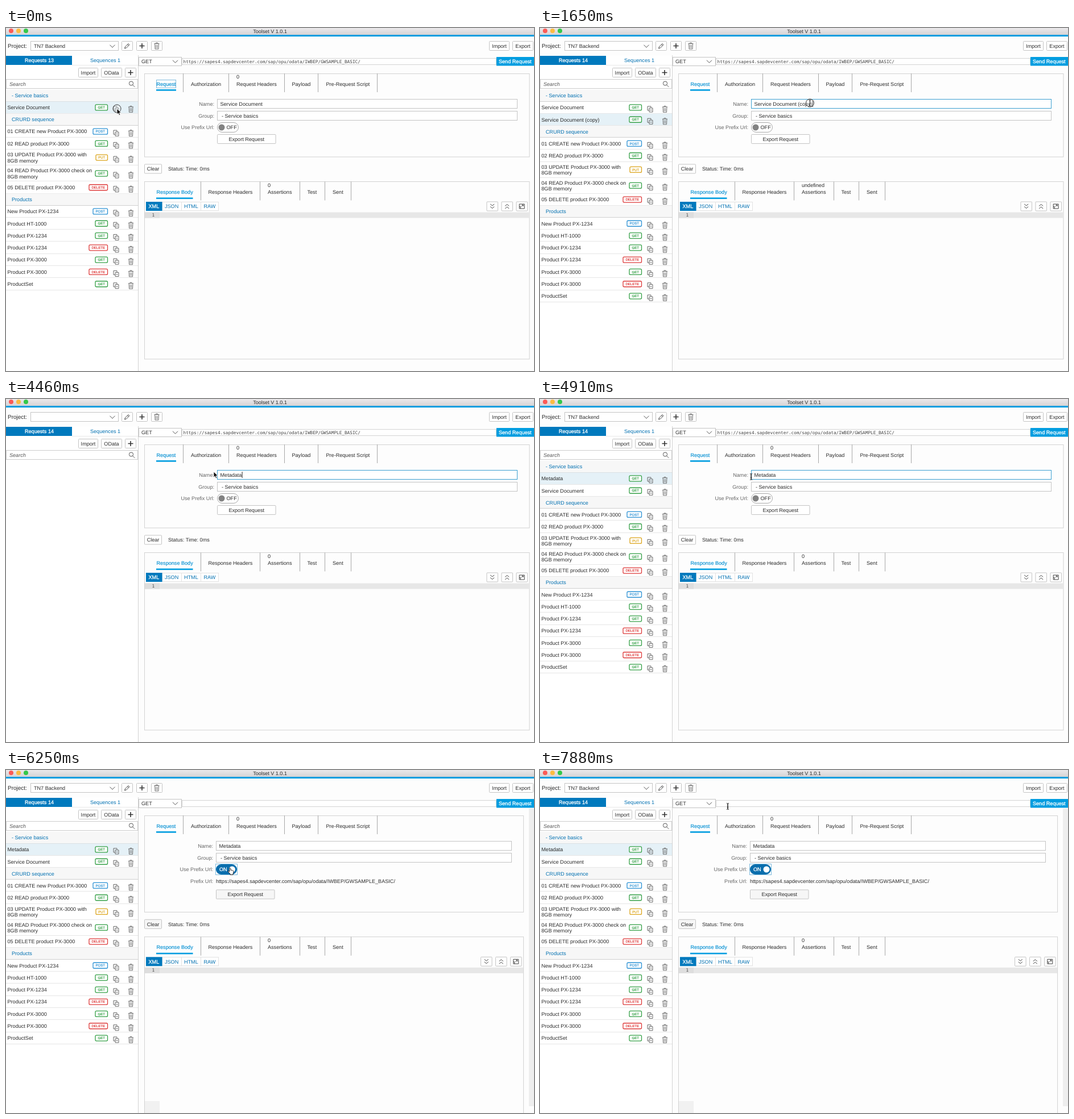
An HTML page for the animation above (8000 ms loop, 928 by 604 pixels).

```html
<!DOCTYPE html>
<html lang="en">
<head>
<meta charset="utf-8">
<style>
  html, body { margin: 0; width: 100%; height: 100%; overflow: hidden; background: #fdfdfd; }
  svg { display: block; width: 928px; height: 604px; }
  text { font: 9.1px "Liberation Sans", Arial, sans-serif; fill: #2c2c2c; text-rendering: geometricPrecision; }
  .mono { font: 7.72px "DejaVu Sans Mono", monospace; fill: #444; }
  .blue { fill: #0070b1; }
  .on { fill: #008fd3; stroke: #008fd3; stroke-width: .15; }
  .white { fill: #fff; stroke: #fff; stroke-width: .3; }
  .label { fill: #666; text-anchor: end; }
  .mid { text-anchor: middle; }
  .search { font-style: italic; fill: #555; }
  .big { font-size: 10px; }
  .title { font-size: 9px; text-anchor: middle; }
  .badge { font-size: 6.1px; text-anchor: middle; stroke-width: .2; }
</style>
</head>
<body>
<svg id="stage" viewBox="0 0 928 604"></svg>
<script>
const stage = document.getElementById('stage');
const pen = document.createElement('canvas').getContext('2d');
pen.font = '9.1px "Liberation Sans", Arial, sans-serif';

const LOOP = 8000, TICK = 148.8;
const BLUE = '#009de0', DEEP = '#0079bd', LINE = '#c4c4c4', INK = '#555';
const URL_TEXT = 'https://sapes4.sapdevcenter.com/sap/opu/odata/IWBEP/GWSAMPLE_BASIC/';
const BADGES = {
  GET: [21.5, '#35a047'], POST: [25.5, '#2b91d4'],
  PUT: [20.5, '#dca51c'], DELETE: [32.5, '#de3b3b']
};
const REST = [
  ['CRURD sequence'],
  ['01 CREATE new Product PX-3000', 'POST'],
  ['02 READ product PX-3000', 'GET'],
  ['03 UPDATE Product PX-3000 with|8GB memory', 'PUT'],
  ['04 READ Product PX-3000 check on|8GB memory', 'GET'],
  ['05 DELETE product PX-3000', 'DELETE'],
  ['Products'],
  ['New Product PX-1234', 'POST'],
  ['Product HT-1000', 'GET'],
  ['Product PX-1234', 'GET'],
  ['Product PX-1234', 'DELETE'],
  ['Product PX-3000', 'GET'],
  ['Product PX-3000', 'DELETE'],
  ['ProductSet', 'GET']
];
// time, x, y of the pointer's hot spot
const PATH = [
  [0, 195, 142], [300, 195, 142], [1190, 452, 155], [1490, 473, 139], [1630, 475, 132],
  [1780, 462, 132], [2090, 366, 132], [2230, 365, 128], [4760, 365, 128], [5500, 395, 172],
  [5900, 394, 173], [7140, 394, 173], [7880, 330, 64]
];

const text = (x, y, s, cls = '') => `<text x="${x}" y="${y}" class="${cls}">${s}</text>`;
const rect = (x, y, w, h, fill = 'none', stroke = 'none', more = '') =>
  `<rect x="${x}" y="${y}" width="${w}" height="${h}" fill="${fill}" stroke="${stroke}" ${more}/>`;
const path = (x, y, d, stroke = INK, more = 'fill="none"') =>
  `<path transform="translate(${x} ${y})" d="${d}" stroke="${stroke}" ${more}/>`;
const circle = (x, y, r, fill, stroke = 'none') =>
  `<circle cx="${x}" cy="${y}" r="${r}" fill="${fill}" stroke="${stroke}"/>`;
const hline = (x, y, w, color) => rect(x, y, w, 1, color);
const dotted = (x, y, w, h) => rect(x, y, w, h, 'none', DEEP, 'stroke-dasharray="1 1"');
const button = (x, y, w, label = '', fill = '#fff') =>
  rect(x + .5, y + .5, w - 1, 16, fill, LINE, 'rx="1"') + text(x + w / 2, y + 11.8, label, 'mid');
const chevron = (x, y) => path(x, y, 'M-4.5-2.3L0 2.3L4.5-2.3');
const plus = (x, y) => path(x, y, 'M-4.5 0h9M0-4.5v9', '#333', 'stroke-width="1.6"');
const trash = (x, y) => path(x, y,
  'M-4.5-4h9M-1.5-4v-1.5h3v1.5M-3.5-4l.5 9.5h6l.5-9.5M-1.2-2v6M1.2-2v6', '#666', 'fill="none" stroke-width=".9"');
const copyIcon = (x, y) => path(x, y, 'M-1.5 2h-3v-7h6v3M-1.5-2h6v7h-6zM0 1.5h3', '#666');

function pointerAt(t) {
  const q = Math.floor((t + 10) / TICK) * TICK;
  const i = PATH.findIndex(p => p[0] > q);
  if (i < 0) return PATH[PATH.length - 1].slice(1);
  const [a, b] = [PATH[i - 1], PATH[i]], k = (q - a[0]) / (b[0] - a[0]);
  return [a[1] + (b[1] - a[1]) * k, a[2] + (b[2] - a[2]) * k];
}

function nameAt(t) {
  if (t < 300) return 'Service Document';
  if (t < 2840) return 'Service Document (copy)';
  const n = t < 3570 ? Math.min(4, 1 + Math.floor((t - 2830) / 147))
                     : Math.min(8, 5 + Math.floor((t - 3560) / 147));
  return 'Metadata'.slice(0, n);
}

function header(t) {
  return rect(0, 0, 928, 12, 'url(#bar)') + rect(0, 12, 928, 3, BLUE)
    + circle(9, 5, 4, '#fc5b57') + circle(22, 5, 4, '#fdbc40') + circle(35, 5, 4, '#34c84a')
    + text(464, 8.8, 'Toolset V 1.0.1', 'title')
    + text(3, 35, 'Project:', 'big') + rect(43.5, 23.5, 154, 16, '#fff', LINE)
    + (t >= 4460 && t < 4610 ? '' : text(49, 35, 'TN7 Backend')) + chevron(187, 32)
    + button(203, 23, 20) + path(213, 31.5, 'M-4.5 4.5l1-3l5.5-5.5l2 2l-5.5 5.5zM.5-2.5l2 2', '#444')
    + button(229, 23, 20) + plus(239, 31.5)
    + button(255, 23, 20) + trash(265, 31.5)
    + button(849, 23, 36, 'Import') + button(890, 23, 37, 'Export');
}

function list(t) {
  if (t >= 4460 && t < 4610) return '';
  const own = ['Service Document'];
  if (t >= 4610) own.unshift('Metadata');
  else if (t >= 300) own.push('Service Document (copy)');
  const active = t >= 300 && t < 4460 ? 2 : 1;
  const rows = [['- Service basics'], ...own.map(s => [s, 'GET']), ...REST];
  let y = 108.6, out = '';
  rows.forEach(([label, verb], i) => {
    const lines = label.split('|');
    const h = !verb ? 20.9 : lines.length > 1 ? 28 : 21.3;
    const c = y + h / 2 - .2;
    if (!verb) out += rect(0, y, 232, h, '#f7f7f7') + text(10, c + 3.3, label, 'blue');
    else {
      const [w, color] = BADGES[verb];
      if (i === active) out += rect(0, y, 232, h, '#e5f1f7');
      lines.forEach((s, n) => out += text(2.5, c + 3.3 + (n - (lines.length - 1) / 2) * 10.2, s));
      out += rect(178.5 - w, c - 5, w, 10, '#fff', color, 'rx="2" stroke-width="1.3"')
        + `<text x="${178.5 - w / 2}" y="${c + 2.2}" class="badge" style="fill:${color};stroke:${color}">${verb}</text>`
        + copyIcon(193.5, c + 3) + trash(219.5, c + 3);
    }
    y += h;
    out += hline(0, Math.round(y) - 1, 232, verb ? '#e6e6e6' : '#d0d0d0');
  });
  return out;
}

function sidebar(t) {
  return rect(0, 48, 232, 556, '#fff') + rect(0, 49, 116, 16, DEEP)
    + text(33, 60.3, 'Requests ' + (t < 300 ? 13 : 14), 'white') + text(148, 60.3, 'Sequences 1', 'blue')
    + hline(116, 65, 116, '#e8e8e8')
    + button(127, 70, 35, 'Import') + button(167, 70, 37, 'OData') + button(209, 70, 20) + plus(219, 78.5)
    + rect(.5, 90.5, 231, 16, '#fff', '#ccc') + text(6, 102, 'Search', 'search')
    + circle(220, 97.5, 3.6, 'none', INK) + path(222.7, 100.2, 'M0 0l3.6 3.6')
    + list(t) + rect(232, 48, 1, 556, '#d2d2d2');
}

// tab strip: entries are [x, label, separator x, optional note above]
function tabs(y, entries, underline) {
  return entries.map(([x, s, sep, note], i) =>
    text(x, y + 21.5, s, i ? '' : 'on') + rect(sep, y, 1, 33, '#a8a8a8')
    + (note ? text(x, y + 9.3, note) : '')).join('')
    + rect(264, y + 28, underline, 2.6, BLUE);
}

function form(t, x, y) {
  const on = t >= 5960, dx = on ? -2 : 0, right = on ? 888.5 : 898.5;
  const focus = t >= 1510 && t < 5660, name = nameAt(t);
  const L = 371 + dx, w = right - L - .5;
  const field = (top, hot) => rect(L + .5, top + .5, w, 16, '#fff', hot ? '#3b9fd0' : LINE);
  const groupHot = t >= 1210 && t < 1510;
  const end = 376.5 + pen.measureText(name).width;
  let out = text(L - 5, 137, 'Name:', 'label') + field(125, focus);
  if (t >= 1800 && t < 2840) {
    const from = Math.max(376.5, x);
    out += rect(from, 128, end - from, 11.5, '#b3d7fd');
  }
  out += text(L + 5.5, 137, name);
  if (t >= 1650 && t < 1800 || t >= 2840 && t < 4910) out += rect(end + .2, 128, .9, 11, '#111');
  out += text(L - 5, 157.7, 'Group:', 'label') + field(146, groupHot) + text(L + 8, 157.7, '- Service basics')
    + text(L - 5, 178.3, 'Use Prefix Url:', 'label');
  if (on) {
    const k = Math.min(1, (t - 5960) / 300);
    out += rect(L, 166, 37, 18, '#0a6ead', 'none', 'rx="9"')
      + text(375, 178, 'ON', 'white') + circle(377 + 21 * k, 175, 5.5, '#fff') + dotted(368.5, 165.5, 38, 19)
      + text(364, 199, 'Prefix Url:', 'label') + text(369, 199, URL_TEXT)
      + button(L, 210.5, 103.5, 'Export Request', '#f6f6f6');
  } else {
    const hot = t >= 5360;
    out += rect(L + .5, 166.5, 37, 17, '#fff', hot ? '#3b9fd0' : '#aaa', 'rx="8.5"')
      + circle(379, 175, 5.5, '#828282') + text(387.5, 178.2, 'OFF', 'off')
      + button(L, 187, 103.5, 'Export Request');
  }
  return out;
}

function main(t, x, y) {
  const on = t >= 5960, dy = on ? 23.3 : 0, dx = on ? -10.4 : 0, right = 920 + dx;
  const fresh = t >= 300 && t < 2840;
  let out = rect(233.5, 51.5, 75, 15, '#fff', LINE) + text(238, 62, 'GET') + chevron(297.5, 59)
    + rect(309.5, 53.5, 552, 11, '#fff', '#d4d4d4') + (on ? '' : text(311.5, 61.5, URL_TEXT, 'mono'))
    + rect(862, 51, 66, 15.5, BLUE) + text(866, 62, 'Send Request', 'white')
    + rect(243.5, 80.5, right - 243.5, 146.5 + dy, 'none', '#d2d2d2')
    + tabs(80, [[264.5, 'Request', 311], [325, 'Authorization', 391],
      [405, 'Request Headers', 489, fresh ? '' : '0'], [502.5, 'Payload', 548], [562.5, 'Pre-Request Script', 652]], 35)
    + (t < 300 ? dotted(264.5, 91.5, 34, 14) : '')
    + form(t, x, y);

  const top = 270;
  const tool = (bx, d) => button(bx + dx, 305.5, 20.5) + path(bx + dx + 10.2, 314, d, '#444');
  out += `<g transform="translate(0 ${dy})">`
    + button(243, 239.5, 31, 'Clear', on ? '#f6f6f6' : '#fff') + text(285, 251.3, 'Status: Time: 0ms')
    + rect(243.5, top + .5, right - 243.5, on ? 400 : 312.5, 'none', '#d2d2d2')
    + tabs(top + .5, [[264.5, 'Response Body', 342], [355.5, 'Response Headers', 446],
      [460, 'Assertions', 516, fresh ? 'undefined' : '0'], [529.5, 'Test', 560], [574, 'Sent', 606]], 64.5)
    + rect(274.5, 306.5, 99, 15, '#fff', '#e2e2e2')
    + rect(308, 306, 1, 16, '#e2e2e2') + rect(342, 306, 1, 16, '#e2e2e2')
    + rect(246, 306, 28.5, 16, DEEP) + text(250.5, 317.3, 'XML', 'white')
    + text(279, 317.3, 'JSON', 'blue') + text(313, 317.3, 'HTML', 'blue') + text(347.5, 317.3, 'RAW', 'blue')
    + tool(844.5, 'M-3.5-4L0-1L3.5-4M-3.5 .5L0 3.5L3.5 .5')
    + tool(870.5, 'M-3.5-.5L0-3.5L3.5-.5M-3.5 4L0 1L3.5 4')
    + tool(896.5, 'M-4.5-4h9v8h-9zM-2.5 4v-3.5h-2M-1 .5L2.5-2.5M0-2.5h2.5v2.5')
    + rect(244, 324.5, right - 244.5, 10, '#e7e7e7') + rect(244, 324.5, 26, 10, '#dedede')
    + text(256.5, 332.2, '1', 'mono') + '</g>';
  if (on) out += rect(244, 583, 26, 21, '#f1f1f1') + rect(919, 68, 9, 524, '#eeeeee');
  return out;
}

function pointer(t, x, y) {
  const drag = t >= 1650 && t < 2240, press = t < 150 || drag || t >= 5660 && t < 5960;
  const inField = x > 371 && (y > 125 && y < 142 || y > 146 && y < 163) || x > 309 && y < 66;
  const onToggle = x > 371 && x < 408 && y > 166 && y < 184;
  let out = press ? circle(x, onToggle ? y + 1 : y, 7, 'rgba(255,255,255,.25)', '#333') : '';
  if (drag || inField) out += path(x, y, 'M-2-5.5q2 0 2 1.5v8q0 1.5-2 1.5M2-5.5q-2 0-2 1.5v8q0 1.5 2 1.5M-1.2 1.5h2.4', '#222');
  else if (onToggle) out += path(x, y,
    'M-1.3 0q1.3-1.3 2 .3l.4 3.2q1.4-.7 1.9.3q1.3-.5 1.7.5q1.3-.2 1.3 1.4q0 2.3-1 3.5v2.3h-5v-1.6l-3.7-4q-.4-1.6 1.6-.9l1 .8z',
    '#111', 'fill="#fff" stroke-width=".9"');
  else out += path(x, y, 'M0 0v10l2.3-2.1l1.6 3.6l1.8-.8l-1.6-3.5h3.2z', '#fff', 'fill="#111" stroke-width=".8"');
  return out;
}

const DEFS = `<defs><linearGradient id="bar" x2="0" y2="1">
  <stop stop-color="#ebe9eb"/><stop offset="1" stop-color="#d5d3d5"/></linearGradient></defs>`;
let last = '';

function draw(now) {
  const t = now % LOOP, [x, y] = pointerAt(t);
  const picture = DEFS + rect(0, 0, 928, 604, '#fdfdfd')
    + header(t) + sidebar(t) + main(t, x, y) + pointer(t, x, y);
  if (picture !== last) stage.innerHTML = last = picture;
}

const start = performance.now();
function loop() {
  draw(performance.now() - start);
  requestAnimationFrame(loop);
}
loop();
</script>
</body>
</html>
```
